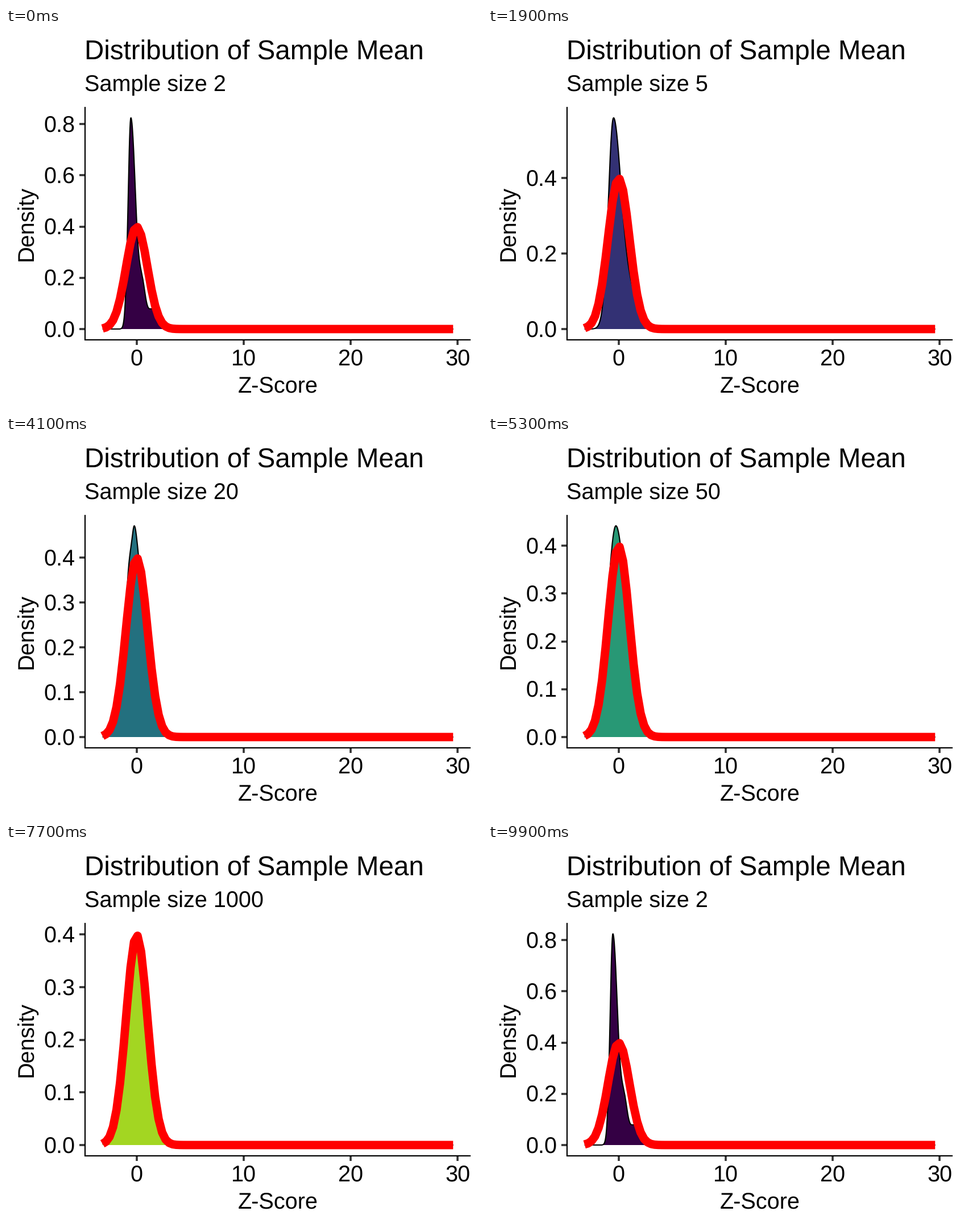
Write a matplotlib script that moves like this. It is 837 px wide and 669 px high and loops after 10000 ms.

```python
import numpy as np
import matplotlib
import matplotlib.pyplot as plt
from matplotlib.animation import FuncAnimation

W, H, DPI = 837, 669, 64
PT = 72 / DPI  # points per pixel
LEFT, RIGHT, TOP, BOTTOM = 139, 817.3, 139.5, 548.6
X0, X_UNIT = 229.9, 18.82
Y0, PEAK_Y = 530.0, 158.1
FONT = 39.6

SIZES = [2, 5, 10, 20, 50, 100, 500, 1000, 10000]
HOLD = 4
STEPS = [8, 8, 7, 7, 6, 7, 7, 7, 7]

# Bumps per state: (height, centre, left spread, right spread)
BUMPS = [
    [(.8244, -.55, .26, .44), (.15, .5, .3, .3), (.078, 1.45, .5, .5)],
    [(.62, -.52, .43, .68), (.09, 1.1, .6, .7)],
    [(.497, -.45, .56, .85), (.06, 1.5, .7, .8)],
    [(.43, -.22, .75, .9), (.05, -.8, .2, .2), (.052, -.22, .15, .2),
     (.03, 1.9, .7, .7)],
    [(.455, -.28, .78, .95)],
    [(.435, -.26, .82, .98)],
    [(.412, -.1, .92, 1.02)],
    [(.4015, -.03, .97, 1.01)],
    [(.399, 0, .995, 1)],
]

plt.rcParams["font.family"] = "Liberation Sans"
plt.rcParams["text.hinting"] = "none"

TO_XYZ = np.array([[.4124, .3576, .1805],
                   [.2126, .7152, .0722],
                   [.0193, .1192, .9505]])
WHITE = TO_XYZ.sum(axis=1)


def bump(x, height, mid, left, right):
    return height * np.exp(-.5 * ((x - mid) / np.where(x < mid, left, right)) ** 2)


def to_lab(rgb):
    lin = np.where(rgb <= .04045, rgb / 12.92, ((rgb + .055) / 1.055) ** 2.4)
    t = TO_XYZ @ lin / WHITE
    f = np.where(t > .008856, np.cbrt(t), 7.787 * t + 16 / 116)
    return np.array([116 * f[1] - 16, 500 * (f[0] - f[1]), 200 * (f[1] - f[2])])


def from_lab(lab):
    fy = (lab[0] + 16) / 116
    f = np.array([fy + lab[1] / 500, fy, fy - lab[2] / 200])
    t = np.where(f > .2069, f ** 3, (f - 16 / 116) / 7.787)
    lin = np.clip(np.linalg.solve(TO_XYZ, t * WHITE), 0, 1) ** 1.18
    lin[0] += .035 * max(0, lin[1] - lin[0])  # slightly darker, warmer display
    rgb = np.where(lin <= .0031308, 12.92 * lin, 1.055 * lin ** (1 / 2.4) - .055)
    return np.clip(rgb, 0, 1)


xs = np.linspace(-3.2, 29.58, 1024)
curves = [sum(bump(xs, *b) for b in bumps) for bumps in BUMPS]
labs = [to_lab(c[:3]) for c in matplotlib.colormaps["viridis"](np.linspace(0, 1, 9))]
normal_x = np.linspace(-3.2, 29.56, 101)
normal_y = np.exp(-normal_x ** 2 / 2) / np.sqrt(2 * np.pi)


def px(x):
    return X0 + X_UNIT * x


fig = plt.figure(figsize=(W / DPI, H / DPI), dpi=DPI, facecolor="white")
ax = fig.add_axes([0, 0, 1, 1])
ax.set_xlim(0, W)
ax.set_ylim(H, 0)
ax.axis("off")


def text(x, y, s="", size=FONT, **kw):
    return ax.text(x, y, s, fontsize=size * PT, color="black",
                   va="baseline", **kw)


def line(x, y, width, color="black", z=2, cap="butt"):
    return ax.plot(x, y, lw=width * PT, color=color, zorder=z,
                   solid_capstyle=cap, solid_joinstyle="round")[0]


text(138.5, 55, "Distribution of Sample Mean", FONT * 1.2)
subtitle = text(138.5, 112)
text(477.8, 642.5, "Z-Score", ha="center")
text(47.5, 344, "Density", ha="center", rotation=90, rotation_mode="anchor")

area, = ax.fill([0, 1, 1], [0, 0, 1], lw=0, zorder=1)
outline = line([], [], 2.1, z=2)
bell = line([], [], 14.8, "#ff0000", z=3)

for v in (0, 10, 20, 30):
    line([px(v)] * 2, [BOTTOM, BOTTOM + 9.5], 3.6, "#333333", 4)
    text(px(v) - .3, 595, str(v), ha="center")
ticks = [(line([LEFT - 9.7, LEFT], [0, 0], 3.6, "#333333", 4),
          text(121.2, 0, ha="right")) for _ in range(6)]
line([LEFT, LEFT], [TOP, BOTTOM], 2.2, z=5, cap="projecting")
line([LEFT, RIGHT], [BOTTOM, BOTTOM], 2.2, z=5)


def locate(frame):
    """State index, step into its transition, and that transition's length."""
    for i, n in enumerate(STEPS):
        if frame < HOLD:
            return i, 0, n
        frame -= HOLD
        if frame < n:
            return i, frame + 1, n
        frame -= n


def draw(frame):
    i, step, n = locate(frame)
    j, t = (i + 1) % len(SIZES), step / n
    dens = (1 - t) * curves[i] + t * curves[j]
    top = max(dens.max(), normal_y.max())
    scale = (Y0 - PEAK_Y) / top

    subtitle.set_text(f"Sample size {SIZES[i if step <= 4 else j]}")
    ys = Y0 - scale * dens
    outline.set_data(px(xs), ys)
    area.set_xy(np.column_stack([np.r_[px(xs), px(xs[-1]), px(xs[0])],
                                 np.r_[ys, Y0, Y0]]))
    area.set_facecolor(from_lab((1 - t) * labs[i] + t * labs[j]))
    bell.set_data(px(normal_x), Y0 - scale * normal_y)

    gap = .2 if top > .526 else .1
    for k, (mark, label) in enumerate(ticks):
        v = k * gap
        y = Y0 - scale * v
        shown = v <= 1.05 * top
        mark.set_visible(shown)
        label.set_visible(shown)
        mark.set_ydata([y, y])
        label.set_y(y + 14.3)
        label.set_text(f"{v:.1f}")
    return []


anim = FuncAnimation(fig, draw, frames=100, init_func=lambda: draw(0),
                     interval=100, repeat=True, repeat_delay=0, blit=False)
plt.show()
```
